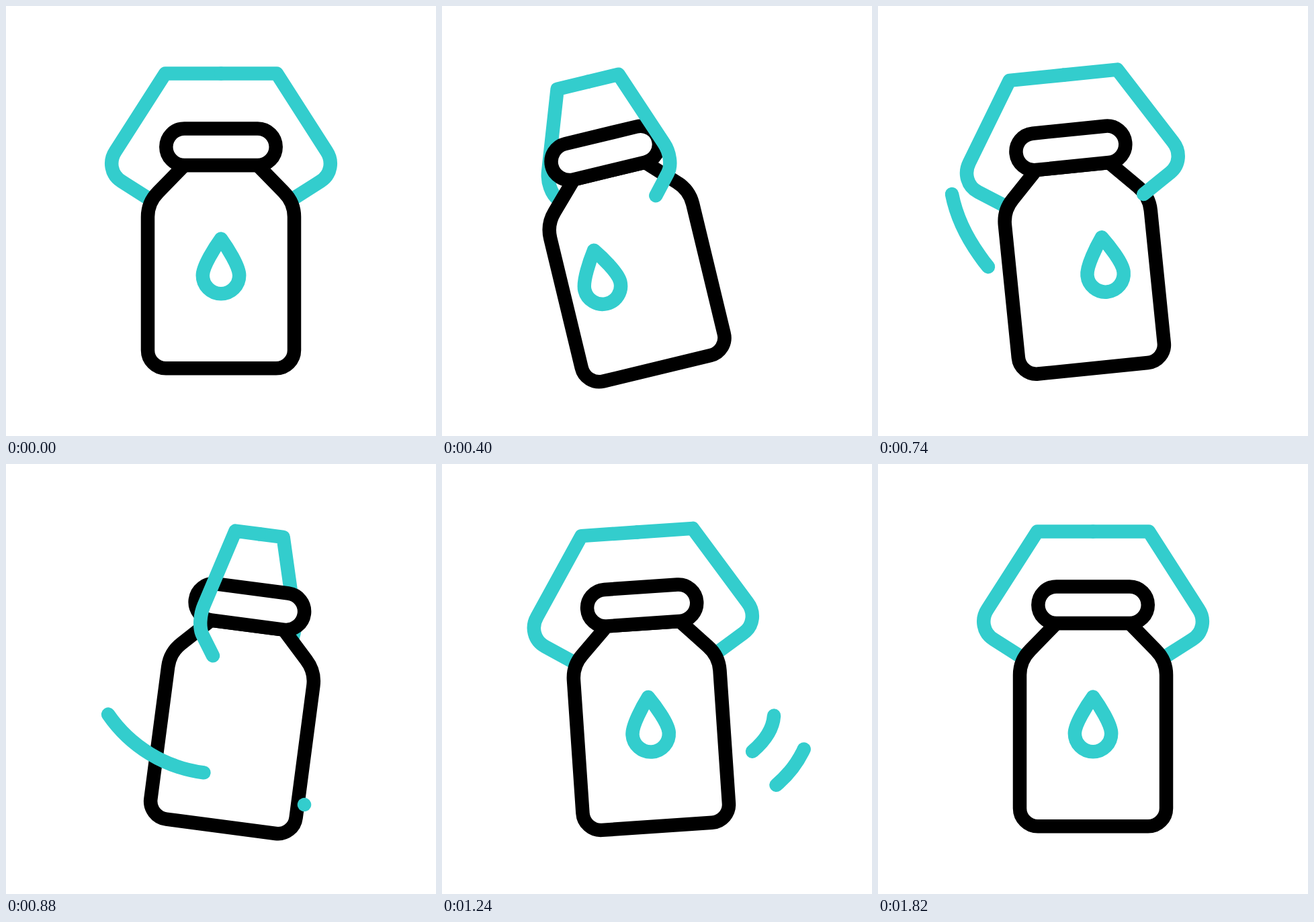
An HTML page that plays this animation: 640 px wide and 640 px high, repeating every 2400 ms.

```html
<!DOCTYPE html>
<html lang="en">
<head>
<meta charset="utf-8">
<title>Shaking bottle</title>
<style>
  html, body { margin: 0; width: 100%; height: 100%; overflow: hidden; background: #fff; }
  svg { display: block; width: 100%; height: 100%; }
  .line { fill: none; stroke-width: 20.5; stroke-linecap: round; stroke-linejoin: round; }
  .cyan { stroke: #33cdcd; }
  .black { stroke: #000; }
</style>
</head>
<body>
<svg viewBox="0 0 640 640">
  <defs>
    <path id="body" d="M265.5 237 L226.5 277 Q211 292.5 211 314 V512 A27 27 0 0 0 238 539.3 H402 A27 27 0 0 0 429 512 V314 Q429 292.5 413.5 277 L374.5 237 Z"/>
    <clipPath id="inside"><use href="#body"/></clipPath>
  </defs>
  <g id="bottle">
    <g id="back"></g>
    <use href="#body" fill="#fff"/>
    <g clip-path="url(#inside)">
      <path id="drop" class="line cyan" d="M320 346.5 C311 359 292.8 387 292.8 401 A27.2 27.2 0 0 0 347.2 401 C347.2 387 329 359 320 346.5 Z"/>
    </g>
    <use href="#body" class="line black"/>
    <rect class="line black" style="fill:#fff" x="238.3" y="182.4" width="163.4" height="54.6" rx="27.3"/>
    <g id="front"></g>
  </g>
  <g id="trails"></g>
</svg>
<script>
const LOOP = 2400, STEP = 20;
const byId = id => document.getElementById(id);

// Keyframes: [time, value]
const TILT = [[0, 0], [587, -17.85], [907, 8], [1215, -4], [1530, 2], [1833, 0]];
const YAW = [[0, 0], [587, 1], [907, -1.03], [1215, 0]];
const DROP = [[0, 0], [587, -66], [907, 145], [1215, 0]];

const TRAILS = [
  { d: "M110 280 Q119 326 151 371 A204 204 0 0 0 300 460", head: [600, 906], tail: [757, 1057] },
  { d: "M412 456 Q440 447 463 427 Q492 402 494 375 L495 360", head: [888, 1330], tail: [1044, 1480] },
  { d: "M444 507 Q471 497 496 479 Q522 458 537 428 L545 411", head: [878, 1330], tail: [1044, 1480] }
];

function ease(t, from, to) {
  const u = Math.min(1, Math.max(0, (t - from) / (to - from)));
  return u * u * (3 - 2 * u);
}

function sample(keys, t) {
  let value = keys[0][1];
  for (let i = 1; i < keys.length; i++) {
    const [start, a] = keys[i - 1], [end, b] = keys[i];
    if (t >= start) value = a + (b - a) * ease(t, start, end);
  }
  return value;
}

function addLine(parent) {
  const path = document.createElementNS("http://www.w3.org/2000/svg", "path");
  path.setAttribute("class", "line cyan");
  parent.append(path);
  return path;
}

// Half of the handle; side is 1 for right and -1 for left
function handlePath(side, width) {
  const p = (x, y) => `${320 + side * width * x} ${y}`;
  return `M${p(0, 100.5)} L${p(83, 100.5)} L${p(157, 216)} ` +
    `C${p(167, 231)} ${p(164, 251)} ${p(148, 261)} L${p(104, 289)}`;
}

const halves = [-1, 1].map(side => ({ side, path: addLine(byId("back")) }));

for (const trail of TRAILS) {
  trail.path = addLine(byId("trails"));
  trail.path.setAttribute("d", trail.d);
  trail.path.setAttribute("pathLength", 1);
}

function draw(t) {
  const yaw = sample(YAW, t);
  const width = 1 - 0.574 * Math.abs(yaw);
  byId("bottle").setAttribute("transform", `rotate(${sample(TILT, t)} 320 539)`);
  byId("drop").setAttribute("transform", `translate(${sample(DROP, t)} 0)`);

  for (const { side, path } of halves) {
    const parent = byId(side * yaw > 0 ? "front" : "back");
    if (path.parentNode !== parent) parent.append(path);
    path.setAttribute("d", handlePath(side, width));
  }

  for (const { path, head, tail } of TRAILS) {
    const end = ease(t, ...head), start = ease(t, ...tail);
    path.style.display = end > start ? "" : "none";
    path.setAttribute("stroke-dasharray", `${end - start} 9`);
    path.setAttribute("stroke-dashoffset", -start);
  }
}

const began = performance.now();
function tick() {
  const t = (performance.now() - began) % LOOP;
  draw(Math.floor(t / STEP) * STEP);
  requestAnimationFrame(tick);
}
tick();
</script>
</body>
</html>
```
